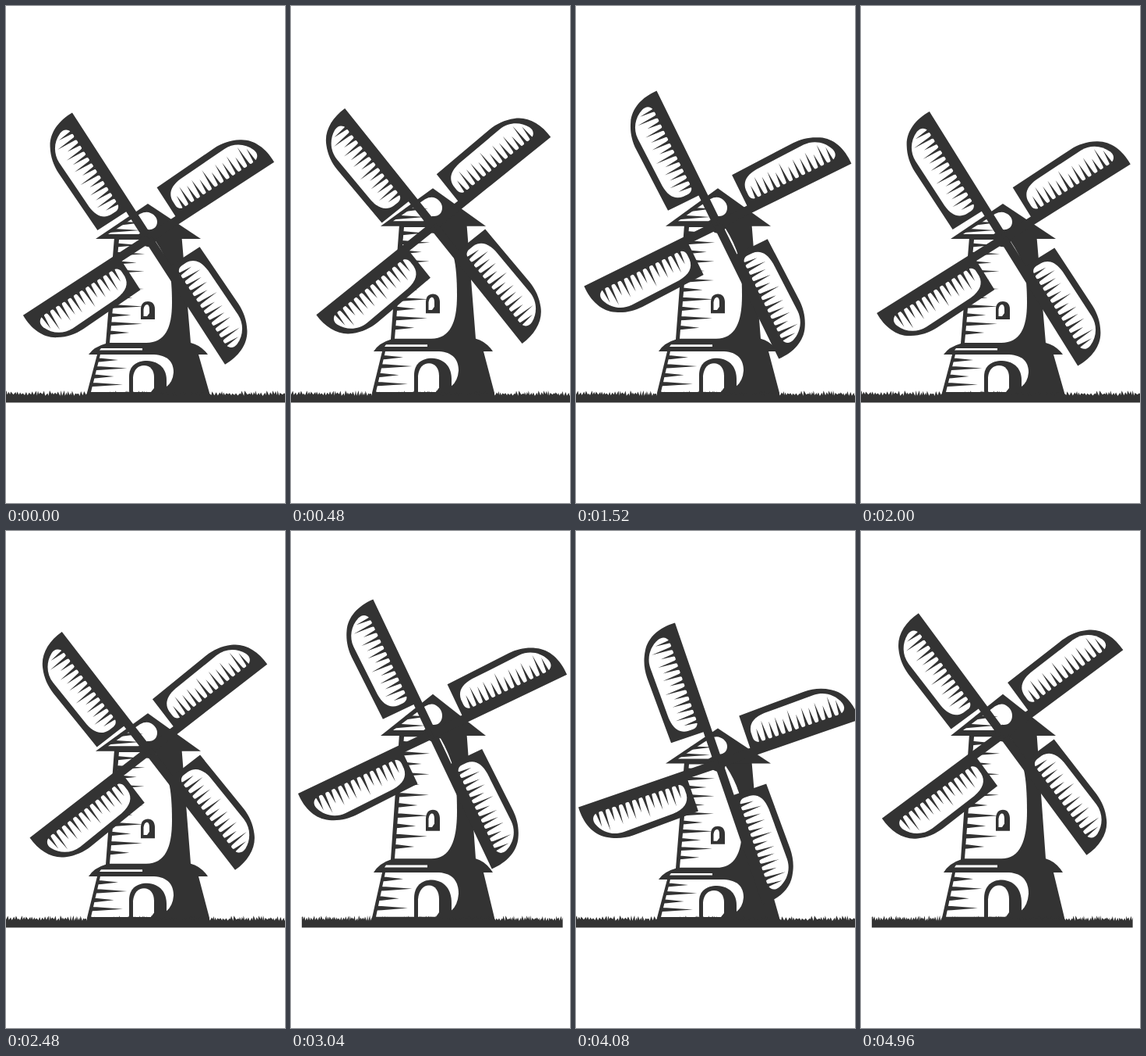
An HTML page that plays this animation: 358 by 636 pixels, repeating every 5.04 s.

```html
<!DOCTYPE html>
<html lang="en">
<head>
<meta charset="utf-8">
<title>Windmill</title>
<style>
  html, body { margin: 0; height: 100%; overflow: hidden; background: #fff; }
  svg { display: block; width: 358px; height: 636px; fill: #333; }
  .white { fill: #fff; }
</style>
</head>
<body>
<svg viewBox="0 0 358 636">
  <defs>
    <g id="sail">
      <path d="M-5.5 0V-44.5H-49.3L-51.5-133C-51.5-145-49-156-42.500-167C-34-182-16-189.500 5.2-188.5L5.5 0Z"/>
      <path class="white" d="M-9-168C-11-175-16-177-22-175C-35-170-43.500-158-43.500-144L-42-76C-41-61-35-53-24-52H-17C-12-52-9-56-9-60Z"/>
      <path id="sailHatch"/>
    </g>
  </defs>

  <g id="tower">
    <!-- body -->
    <path d="M139 296H225.500L237 431Q250 434 259 446H247L261 495V501H104V495L117 446H106Q113 436 128 432Z"/>
    <path class="white" d="M145 299H174L192 301Q203 317 209 335Q213 350 213 380C213 412 204 431 180 431H133Z"/>
    <path class="white" d="M122 438H175V440.5H120Z"/>
    <path class="white" d="M121 446H190C208 447 215 456 215 469Q214 481 206 487L190 494H109Z"/>
    <path id="towerHatch"/>
    <!-- door and window -->
    <path d="M158 496V474C158 461 167 454 181 454C198 455 206 465 206 479V496Z"/>
    <path class="white" d="M163 494V475C164 465 170 460 177 460C185 460 190 466 190 475V489L186 494Z"/>
    <path d="M173 401V388C173 381 177 378 182 378C188 378 191 382 191 388V401Z"/>
    <path class="white" d="M176.500 397V388C177 384 179 382 181 382C183 382 184 385 184 388V393L181 397Z"/>
    <!-- roof -->
    <path d="M182 253L250 298H115Z"/>
    <path class="white" d="M131 292L172 266Q178 263 183 264C190 266 194 271 194 276C194 283 189 287 181 286L170 292Z"/>
    <path d="M148 276L176 277L143 281ZM138 285L172 287L132 290Z"/>
  </g>

  <path id="ground"/>

  <g id="rotor">
    <circle r="10"/>
    <g transform="translate(.7 -.5)">
      <use href="#sail" transform="rotate(-32.9)"/>
      <use href="#sail" transform="rotate(57.1)"/>
      <use href="#sail" transform="rotate(147.1)"/>
      <use href="#sail" transform="rotate(237.1)"/>
    </g>
  </g>
</svg>
<script>
const LOOP = 5040, STEP = 80, FPS = 30;
const BASE = 495, CENTER = 181.5;
const $ = id => document.getElementById(id);
const range = (n, fn) => Array.from({ length: n }, (_, i) => fn(i)).join('');

// Pointed hatch mark with a flared root.
const wedge = (x, y, len, half, neck) => {
  const inner = x + len * .16;
  return `M${x} ${y - half}Q${x} ${y - neck} ${inner} ${y - neck}L${x + len} ${y}` +
    `L${inner} ${y + neck}Q${x} ${y + neck} ${x} ${y + half}Z`;
};

$('sailHatch').setAttribute('d', range(13, i =>
  wedge(-8.5, -168 + i * 9, -20 - 6 * (i % 2) - 2 * Math.sin(i * 2), 4.5, 1.7)));

$('towerHatch').setAttribute('d',
  range(11, i => {
    const y = 306 + i * 11.2;
    return wedge(141 - (y - 298) * .073, y, 30 + 8 * (i % 2) + 4 * Math.sin(i * 3), 2.6, 2.2);
  }) +
  range(4, i => wedge(118 - i * 2.7, 453 + i * 10.5, 26 + 14 * (i % 2), 2.6, 2.2)));

// Ground strip with seeded blades of grass, in units around its center.
let seed = 7;
const random = () => (seed = seed * 16807 % 2147483647) / 2147483647;
let ground = 'M-167.500 507.500V494';
for (let x = -167.5; x < 164;) {
  const width = 1.8 + random() * 1.6;
  ground += `L${x + width * (.2 + random() * .6)} ${492 + random() * 4}`;
  x += width;
  ground += `L${x} ${496.5 + random() * 2.5}`;
}
$('ground').setAttribute('d', ground + 'L167 494V507.500Z');

function draw(now) {
  const time = Math.floor(now % LOOP / STEP) * STEP;
  const tick = Math.round(time * FPS / 1000);
  const stretch = .5 - .5 * Math.cos(Math.PI * tick / FPS);
  $('tower').setAttribute('transform',
    `translate(0 ${BASE}) scale(1 ${1 + .183 * stretch}) translate(0 ${-BASE})`);
  $('rotor').setAttribute('transform',
    `translate(182.3 ${298.2 - 38.8 * stretch}) rotate(${tick * 6.0165})`);
  $('ground').setAttribute('transform',
    `translate(${CENTER} 0) scale(${1 + .33 * (1 - stretch)} 1)`);
  requestAnimationFrame(draw);
}
draw(0);
</script>
</body>
</html>
```
